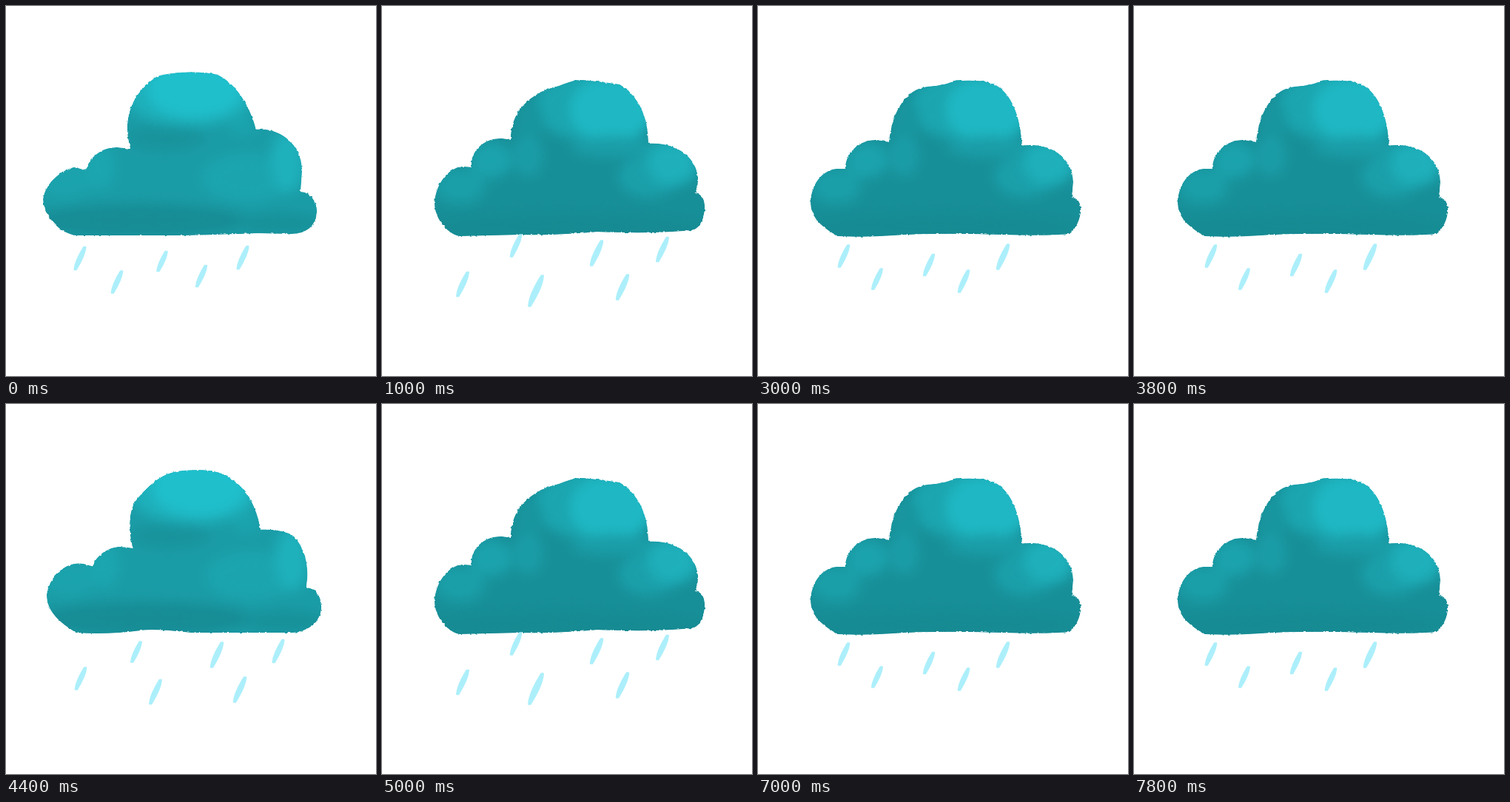
An HTML page that plays this animation: 500x500 px, repeating every 8.01 s.

```html
<!DOCTYPE html>
<html lang="en">
<head>
<meta charset="utf-8">
<title>Rain cloud</title>
<style>
html, body { margin: 0; width: 100%; height: 100%; overflow: hidden; background: #fff; }
svg { display: block; width: 100%; height: 100%; }
</style>
</head>
<body>
<svg id="stage" viewBox="0 0 500 500">
  <defs>
    <filter id="rough" filterUnits="userSpaceOnUse" x="0" y="0" width="500" height="500" color-interpolation-filters="sRGB">
      <feMorphology in="SourceGraphic" operator="dilate" radius="1" result="grown"/>
      <feTurbulence type="fractalNoise" baseFrequency=".2" numOctaves="2" seed="4" result="noise"/>
      <feDisplacementMap in="grown" in2="noise" scale="3" xChannelSelector="R" yChannelSelector="G"/>
    </filter>
    <filter id="soft" filterUnits="userSpaceOnUse" x="0" y="0" width="500" height="500" color-interpolation-filters="sRGB">
      <feGaussianBlur stdDeviation="8"/>
    </filter>
  </defs>
</svg>
<script>
const stage = document.getElementById('stage');
const STEP = 200, LOOP = 8010, CYCLE = 20, DRIFT = 3;

// Paint dabs: x, y, rx, ry, colour, relative to the leftmost cloud position
const paints = {
  bright: { base: '#1a9ca6', dabs: [
    [248, 120, 86, 42, '#1dafba'],
    [255, 112, 64, 38, '#1fbfcc'],
    [215, 178, 55, 18, '#18939c'],
    [320, 160, 18, 14, '#1aa3ad'],
    [325, 232, 60, 32, '#1ba4ae'],
    [380, 210, 22, 42, '#1eb0bb'],
    [80, 236, 34, 24, '#1ba2ac'],
    [126, 218, 20, 30, '#1ba5af'],
    [180, 290, 150, 24, '#178c95'],
    [370, 294, 60, 16, '#17919a']
  ]},
  dim: { base: '#178f98', dabs: [
    [255, 135, 62, 44, '#1ba5af'],
    [295, 140, 56, 44, '#1eb7c3'],
    [185, 155, 20, 26, '#18959e'],
    [182, 202, 20, 28, '#1a9ca6'],
    [300, 190, 60, 14, '#1a9da7'],
    [345, 230, 40, 28, '#1a9fa9'],
    [378, 212, 34, 30, '#1eafba'],
    [90, 243, 34, 24, '#1a9ea7'],
    [132, 208, 28, 24, '#1ba2ac'],
    [230, 298, 190, 20, '#168a92']
  ]}
};

// Each drawing: paint, drift at which it was laid out, outline, drops as x, y, height
const drawings = [
  { paint: 'bright', drift: 0,
    outline: 'M96 309C75 307 53 284 51 262C54 240 77 222 93 219L109 224C113 205 131 192 150 192L170 194C158 160 167 122 204 97C215 92 255 87 285 94C312 107 330 140 337 168C365 164 398 185 399 222L397 252C410 252 420 266 419 279C417 296 405 307 385 307L340 306Q290 308 235 309Z',
    drops: [[100, 341, 32], [150, 373, 31], [211, 345, 28], [264, 365, 30], [320, 340, 32]] },
  { paint: 'bright', drift: 30,
    outline: 'M120 308C100 296 80 280 80 258C85 230 110 213 128 217L142 221C147 203 168 193 180 194L197 196C189 165 190 140 207 124C225 104 240 93 265 91C290 89 310 91 320 98C348 112 362 140 367 171C385 169 405 174 412 180C428 197 434 225 428 249C442 249 450 262 449 276C448 292 432 307 410 308L275 308Q225 302 205 305Q160 311 120 308Z',
    drops: [[125, 371, 31], [200, 335, 29], [226, 389, 34], [309, 339, 35], [340, 386, 35], [392, 334, 32]] },
  { paint: 'dim', drift: 3,
    outline: 'M97 310C70 295 60 282 60 264C62 238 80 220 98 221L107 221C107 200 125 182 148 182L166 185C170 145 188 113 218 110Q240 108 250 104Q256 100 262 102Q300 100 313 111C332 125 342 155 344 190C380 184 412 205 413 238L411 260C421 260 424 270 423 279C421 293 413 303 408 307Q380 310 320 308Q220 305 170 309Q130 312 97 310Z',
    drops: [[104, 338, 31], [149, 369, 29], [219, 350, 30], [266, 372, 31], [319, 339, 35]] },
  { paint: 'dim', drift: 15,
    outline: 'M105 310C88 306 72 285 72 266C74 240 92 219 110 218L122 219C120 196 140 179 162 180L175 182C174 145 200 118 240 109Q262 100 270 101Q300 104 320 107C345 122 359 150 359 187C395 184 424 205 426 233C426 245 423 250 421 254C433 253 436 266 435 276C432 292 427 300 418 302Q370 307 290 304Q240 309 185 308Z',
    drops: [[109, 376, 34], [181, 324, 31], [208, 385, 43], [290, 334, 35], [325, 380, 35], [379, 329, 34]] }
];

function add(parent, name, attrs = {}) {
  const node = document.createElementNS('http://www.w3.org/2000/svg', name);
  for (const key in attrs) node.setAttribute(key, attrs[key]);
  return parent.appendChild(node);
}

function dropPath([x, y, height]) {
  const h = height / 2 - 1, w = h * 0.42;
  return `M${x + w - 1} ${y - h}L${x + w + 1} ${y - h}Q${x + w} ${y - h / 4} ${x - w + 1} ${y + h}L${x - w - 1} ${y + h}Q${x - w} ${y + h / 4} ${x + w - 1} ${y - h}Z`;
}

function build({ paint, drift, outline, drops }, i) {
  const group = add(stage, 'g');
  const rough = add(group, 'g', { filter: 'url(#rough)' });
  const { base, dabs } = paints[paint];
  add(add(stage.querySelector('defs'), 'clipPath', { id: 'clip' + i }), 'path', { d: outline });
  const cloud = add(rough, 'g', { 'clip-path': `url(#clip${i})` });
  add(cloud, 'path', { d: outline, fill: base });
  const shade = add(cloud, 'g', { filter: 'url(#soft)' });
  for (const [x, y, rx, ry, fill] of dabs) add(shade, 'ellipse', { cx: x + drift, cy: y, rx, ry, fill });
  for (const drop of drops) {
    add(group, 'path', { d: dropPath(drop), fill: '#aceffb', stroke: '#aceffb', 'stroke-width': 2.6, 'stroke-linejoin': 'round' });
  }
  return group;
}

const groups = drawings.map(build);

function render(time) {
  const step = Math.min(39, Math.floor((time % LOOP) / STEP)) % CYCLE;
  const drift = DRIFT * Math.min(step, CYCLE - step);
  const dim = Math.floor(step / 5) % 2;
  const fallen = step % 4 === 1 || step % 4 === 2 ? 1 : 0;
  const current = dim * 2 + fallen;
  groups.forEach((group, i) => group.setAttribute('display', i === current ? 'inline' : 'none'));
  groups[current].setAttribute('transform', `translate(${drift - drawings[current].drift} 0)`);
}

const start = performance.now();
function tick() {
  render(performance.now() - start);
  requestAnimationFrame(tick);
}
tick();
</script>
</body>
</html>
```
